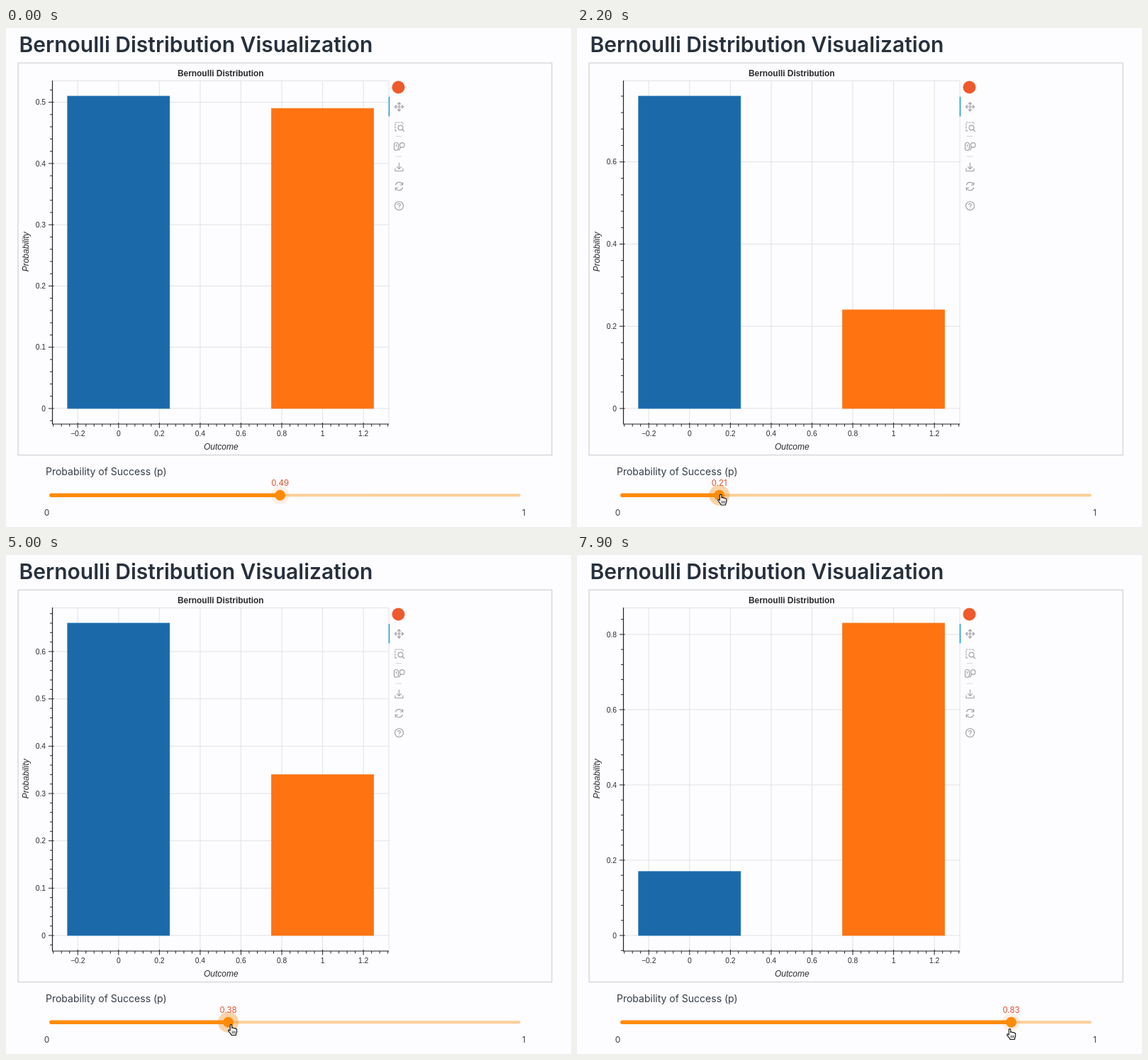
Recreate the animation shown at these times as an HTML page. Size 797x703 px, loop 8000 ms.

```html
<!DOCTYPE html>
<html lang="en">
<head>
<meta charset="utf-8">
<title>Bernoulli Distribution Visualization</title>
<style>
html, body { margin: 0; width: 100%; height: 100%; overflow: hidden; background: #fdfcfe; }
svg { display: block; width: 797px; height: 703px; }
text { font-family: "Liberation Sans", Arial, sans-serif; fill: #2a2a2e; }
.ui { font-family: Inter, sans-serif; fill: #353d47; }
.tick { font-size: 10.3px; }
.axis { font-size: 12px; font-style: italic; text-anchor: middle; }
.grid { stroke: #e2e2e4; fill: none; }
.line { stroke: #222; fill: none; }
.tools { stroke: #a1a4a8; stroke-width: 1.2; fill: none; stroke-linecap: round; stroke-linejoin: round; }
</style>
</head>
<body>
<svg viewBox="0 0 797 703">
  <rect width="797" height="703" fill="#fdfcfe"/>
  <text class="ui" x="18.5" y="34" font-size="30" font-weight="600" style="fill:#27313d">Bernoulli Distribution Visualization</text>
  <rect x="17" y="49.2" width="753" height="552.5" fill="none" stroke="#c8c8cb"/>
  <text x="302.8" y="67.6" font-size="11.9" font-weight="700" text-anchor="middle">Bernoulli Distribution</text>

  <path class="grid" d="M65.5 74.5H540V558"/>
  <path class="grid" id="xGrid"/>
  <path class="grid" id="yGrid"/>
  <rect id="fail" x="86.8" width="144" fill="#1c69a9" stroke="#1f77b4" stroke-width=".8"/>
  <rect id="win" x="374.6" width="144" fill="#ff7311" stroke="#f47a1c" stroke-width=".8"/>
  <path class="line" d="M65.5 74V558H540" stroke-width="1.2"/>
  <path class="line" id="xTicks"/>
  <path class="line" id="yTicks"/>
  <g id="xLabels" class="tick" text-anchor="middle"></g>
  <g id="yLabels" class="tick" text-anchor="end"></g>
  <text class="axis" x="303.3" y="593.5">Outcome</text>
  <text class="axis" transform="translate(31.5 315.3) rotate(-90)">Probability</text>

  <circle cx="553.5" cy="83.5" r="9" fill="#ee5a2c"/>
  <path d="M540.5 97V124.5" stroke="#26a0d6" stroke-width="1.6"/>
  <path d="M549.5 152.5H558M549.5 181H558" stroke="#d5d5d9"/>
  <g class="tools">
    <path d="M548.5 111H560.5M554.5 105V117M552.5 107L554.5 105L556.5 107M552.5 115L554.5 117L556.5 115M550.5 109L548.5 111L550.5 113M558.5 109L560.5 111L558.5 113"/>
    <path d="M549 145V133H560V135M549 145H552" stroke-dasharray="2 2"/>
    <circle cx="556.5" cy="140.5" r="3.4"/><path d="M559 143L561.5 145.5"/>
    <rect x="547.5" y="161.5" width="6" height="11" rx="3"/><path d="M550.5 164.5V167"/>
    <circle cx="558.7" cy="165" r="3.3"/><path d="M556.5 167.5L554.8 172"/>
    <path d="M554.5 190V198.5M551.5 195.7L554.5 198.7L557.5 195.7M549 198V201.5H560V198"/>
    <path d="M549.5 221A5.2 5.2 0 0 1 559.3 220.6M559.7 217.5V221H556.3M559.5 225A5.2 5.2 0 0 1 549.7 225.4M549.3 228.5V225H552.7"/>
    <circle cx="554.5" cy="250.5" r="6"/>
    <path d="M552.7 249A1.8 1.8 0 1 1 554.5 251V251.6M554.5 253.6V253.7"/>
  </g>

  <text class="ui" x="56" y="629.5" font-size="14">Probability of Success (p)</text>
  <text class="ui" x="57.5" y="687" font-size="12" text-anchor="middle">0</text>
  <text class="ui" x="730.5" y="687" font-size="12" text-anchor="middle">1</text>
  <rect x="61.2" y="656.2" width="664.5" height="4" rx="2" fill="#fccf98"/>
  <rect id="fill" x="61.2" y="655.5" height="5.4" rx="2.5" fill="#ff8b08"/>
  <text class="ui" id="value" y="645.3" font-size="11.4" text-anchor="middle" style="fill:#d8532f"></text>
  <circle id="halo" cy="658.3" fill="#f58a10"/>
  <circle id="thumb" cy="658.3" r="7.5" fill="#ff8b08"/>
  <g id="cursor" stroke-linejoin="round" stroke-linecap="round">
    <g id="hand" fill="#fff" stroke="#111" stroke-width="1.1">
      <path d="M3.2 9.2V1.8C3.2.2 5.7.2 5.7 1.8V5.4C6.4 4.6 8 4.8 8.2 5.9C9 5.2 10.3 5.5 10.5 6.6C11.5 6.1 12.6 6.7 12.6 7.8V10.8C12.6 12.4 11.4 13.2 11.3 15.5H5C4.4 13.4 2 11.6.8 9.6C0 8.2 1.6 7.2 3.2 9.2Z"/>
      <path d="M6.2 10V13M8.2 10V13M10.2 10V13" stroke-width=".8"/>
    </g>
    <path id="arrow" d="M0 0V12.6L2.9 10L5 14.8L7.2 13.8L5.1 9.2H9Z" fill="#111" stroke="#fff" stroke-width=".9"/>
  </g>
</svg>
<script>
const LOOP = 8000, STEP = 100, LAG = 100;
const ZERO = 536, TALL = 440;
const $ = id => document.getElementById(id);
const set = (id, attrs) => {
  for (const key in attrs) $(id).setAttribute(key, attrs[key]);
};

// [time, value...]
const slide = [[800, .49], [1600, .35], [2750, .09], [2900, .09], [3500, .05], [4100, .13],
  [4300, .13], [5000, .38], [5600, .52], [6400, .79], [6500, .8], [6700, .8], [7400, .83]];
const pointer = [[400, 440, 695], [800, 381, 657], [1600, 288, 657], [2750, 116, 656],
  [2900, 116, 656], [3500, 90, 656], [4100, 150, 656], [4300, 150, 656], [5000, 313, 661],
  [5600, 411, 670], [6300, 590, 680], [6500, 598, 680], [7000, 606, 680], [7600, 606, 680], [7900, 606, 667]];

function sample(keys, t, col = 1) {
  if (t <= keys[0][0]) return keys[0][col];
  const i = keys.findIndex(k => k[0] >= t);
  if (i < 0) return keys[keys.length - 1][col];
  const a = keys[i - 1], b = keys[i];
  return a[col] + (b[col] - a[col]) * (t - a[0]) / (b[0] - a[0]);
}

const probability = t => Math.round(sample(slide, t) * 100) / 100;
const toX = v => 158.8 + 287.8 * v;
const number = v => String(+v.toFixed(1)).replace("-", "\u2212");
const label = (x, y, v) => `<text x="${x}" y="${y}">${number(v)}</text>`;

function drawX() {
  let grid = "", ticks = "", labels = "";
  for (let i = -8; i <= 33; i++) {
    const x = toX(i * .04), major = i % 5 === 0;
    ticks += major ? `M${x} 556V563.5` : `M${x} 558V561.5`;
    if (!major) continue;
    grid += `M${x} 74V558`;
    labels += label(x, 575, i * .04);
  }
  set("xGrid", { d: grid });
  set("xTicks", { d: ticks });
  $("xLabels").innerHTML = labels;
}

function drawChart(p) {
  const q = 1 - p, max = Math.max(p, q);
  const minor = (max * 1.1 > .8 ? .2 : .1) / 5;
  const toY = v => ZERO - v / max * TALL;
  let grid = "", ticks = "", labels = "";
  const last = Math.floor(max * 1.05 / minor);
  for (let i = Math.ceil(-max * .05 / minor); i <= last; i++) {
    const y = toY(i * minor), major = i % 5 === 0;
    ticks += major ? `M60 ${y}H67.5` : `M62 ${y}H65.5`;
    if (!major) continue;
    grid += `M65.5 ${y}H540`;
    labels += label(56, y + 3.7, i * minor);
  }
  set("yGrid", { d: grid });
  set("yTicks", { d: ticks });
  $("yLabels").innerHTML = labels;
  set("fail", { y: toY(q), height: ZERO - toY(q) });
  set("win", { y: toY(p), height: ZERO - toY(p) });
}

function drawSlider(p, dragging) {
  const x = 61.2 + 664.2 * p;
  set("fill", { width: x - 61.2 });
  set("thumb", { cx: x });
  set("halo", { cx: x, r: dragging ? 14.5 : 12.5, opacity: dragging ? .36 : .11 });
  set("value", { x });
  $("value").textContent = p.toFixed(2);
}

function drawCursor(t) {
  const x = sample(pointer, t), y = sample(pointer, t, 2), arrow = y > 677;
  set("cursor", { transform: `translate(${x} ${y})`, visibility: t < 400 ? "hidden" : "visible" });
  set("arrow", { display: arrow ? "inline" : "none" });
  set("hand", { display: arrow ? "none" : "inline" });
}

function render(ms) {
  const t = Math.floor(ms % LOOP / STEP) * STEP;
  drawChart(probability(t - LAG));
  drawSlider(probability(t), t >= 800 && t < 6400 || t >= 6700 && t < 7500);
  drawCursor(t);
}

drawX();
const start = performance.now();
function frame(now) {
  render(Math.max(0, now - start));
  requestAnimationFrame(frame);
}
render(0);
requestAnimationFrame(frame);
</script>
</body>
</html>
```
